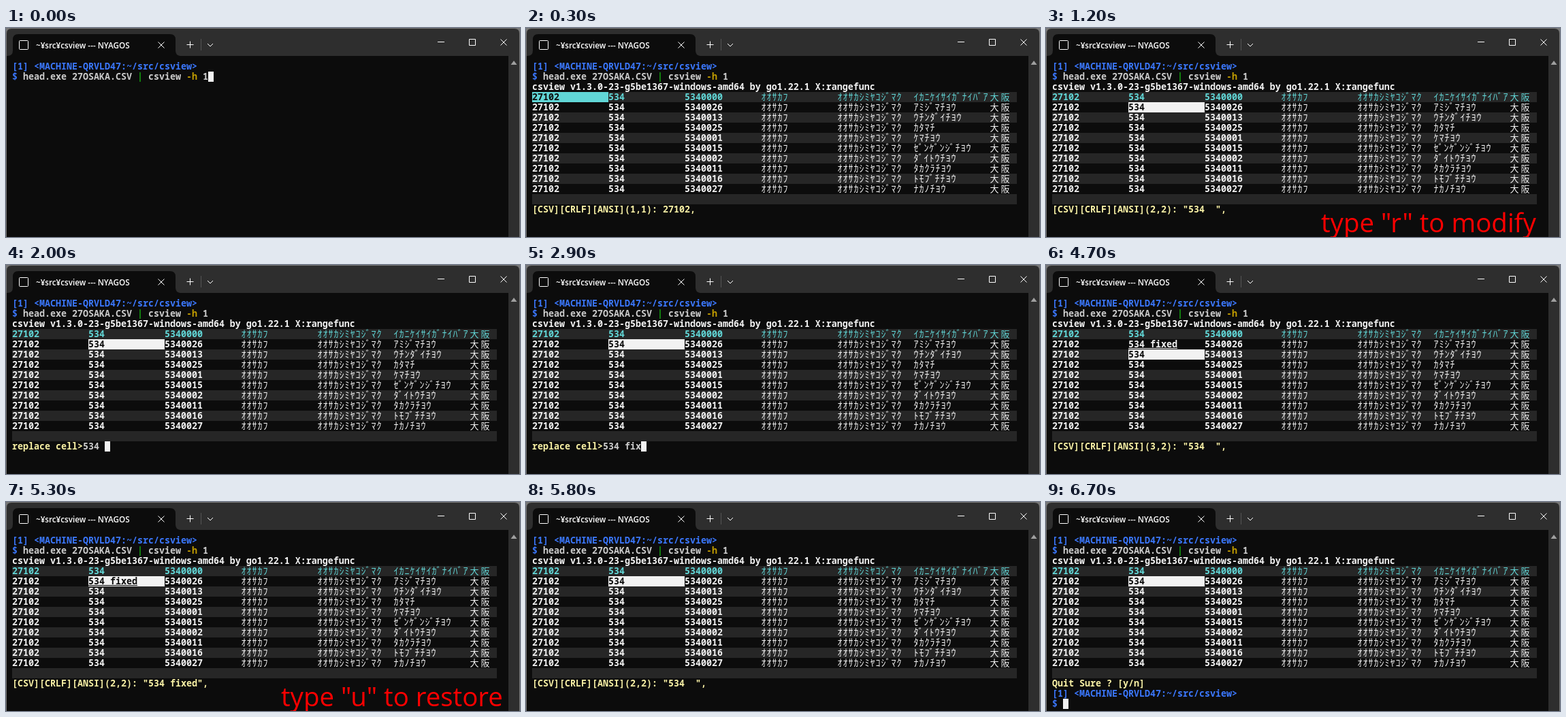
These frames come from a looping animation (755 px wide and 307 px high, 7000 ms). An HTML page:

```html
<!DOCTYPE html>
<html lang="en">
<head>
<meta charset="utf-8">
<title>csview in a terminal</title>
<style>
html, body { margin: 0; width: 100%; height: 100%; overflow: hidden; background: #0c0c0c; }
svg { display: block; }
text { white-space: pre; }
.mono { font: 600 13.333px "Noto Sans Mono", "DejaVu Sans Mono", monospace; }
.kana { font: 500 14px "Noto Sans CJK JP", "Noto Sans CJK", sans-serif; letter-spacing: 1px; }
.kanji { font: 500 13px "Noto Sans CJK JP", "Noto Sans CJK", sans-serif; letter-spacing: 3px; }
.title { font: 600 11.7px "Open Sans", "Noto Sans", sans-serif; fill: #fff; }
.note { font: 400 38.4px "Open Sans", "Noto Sans", sans-serif; fill: #f00; }
.line { fill: none; stroke: #fff; }
</style>
</head>
<body>
<svg width="755" height="307" viewBox="0 0 755 307">
  <rect width="755" height="307" fill="#777"/>
  <path d="M1 307V8Q1 1 8 1H747Q754 1 754 8V307Z" fill="#2e2e2e"/>
  <path d="M1 41H738V307H1Z" fill="#0c0c0c"/>
  <path d="M2 41Q10 41 10 33V17Q10 9 18 9H241Q249 9 249 17V33Q249 41 257 41Z" fill="#0c0c0c"/>
  <rect class="line" x="19.500" y="18.500" width="13" height="13" rx="1"/>
  <text class="title" x="44" y="29.500">~¥src¥csview --- NYAGOS</text>
  <path class="line" d="M223.500 20.500l9 9m0 -9l-9 9M265.500 24.500h10m-5 -5v10M296 23l4 4l4 -4"/>
  <path d="M286.500 16V33" stroke="#555"/>
  <path class="line" d="M634 20.500h10M680.500 16.500h9v9h-9zM726.500 16.500l9 9m0 -9l-9 9"/>
  <path d="M741.500 54L746 48L750.500 54Z" fill="#a0a0a0"/>
  <g id="screen"></g>
  <text id="note" class="note" x="404" y="300"></text>
</svg>
<script>
const LOOP = 7000, CW = 8, RH = 15, LEFT = 9, TOP = 49;
const BLACK = "#0c0c0c", WHITE = "#f2f2f2", GREY = "#cccccc", BLUE = "#3b78ff",
      CYAN = "#61d6d6", YELLOW = "#f9f1a5", GREEN = "#13a10e", GOLD = "#c19c00", BAND = "#262626";
const HEAD = 3, STATUS = 14, CELL = 14, WIDTH = 89;

const places = [
  "5340000 ｲｶﾆｹｲｻｲｶﾞﾅｲﾊﾞｱ", "5340026 ｱﾐｼﾞﾏﾁﾖｳ", "5340013 ｳﾁﾝﾀﾞｲﾁﾖｳ", "5340025 ｶﾀﾏﾁ",
  "5340001 ｹﾏﾁﾖｳ", "5340015 ｾﾞﾝｹﾞﾝｼﾞﾁﾖｳ", "5340002 ﾀﾞｲﾄｳﾁﾖｳ", "5340011 ﾀｶｸﾗﾁﾖｳ",
  "5340016 ﾄﾓﾌﾞﾁﾁﾖｳ", "5340027 ﾅｶﾉﾁﾖｳ"
].map(s => s.split(" "));

// time, row and column of the selected cell
const moves = [[300, 1, 1], [600, 1, 2], [900, 2, 2], [4100, 2, 3], [4400, 3, 3], [4700, 3, 2], [5000, 2, 2]];

const screen = document.getElementById("screen");
const note = document.getElementById("note");
const escape = s => s.replace(/&/g, "&amp;").replace(/</g, "&lt;").replace(/>/g, "&gt;");

const block = (col, row, cols, fill) =>
  `<rect x="${LEFT + col * CW}" y="${TOP + row * RH}" width="${cols * CW}" height="${RH}" fill="${fill}"/>`;

// wide scripts sit in the middle of their cells
const put = (col, row, s, fill, font = "mono") =>
  `<text class="${font}" x="${LEFT + col * CW + (font === "mono" ? 0 : 0.5)}" y="${TOP + row * RH + 12}" ` +
  `fill="${fill}">${escape(s)}</text>`;

const cursor = (col, row) => block(col, row, 1, WHITE);

const prompt = row =>
  put(0, row, "[1] <MACHINE-QRVLD47:~/src/csview>", BLUE) + put(0, row + 1, "$", BLUE);

const underline = (col, row, cols, fill) =>
  `<rect x="${LEFT + col * CW}" y="${TOP + row * RH + 13}" width="${cols * CW}" height="1" fill="${fill}"/>`;

function table(selRow, selCol, fixed) {
  let out = put(0, 2, "csview v1.3.0-23-g5be1367-windows-amd64 by go1.22.1 X:rangefunc", WHITE);
  for (let r = 0; r <= places.length; r += 2) out += block(0, HEAD + r, WIDTH, BAND);
  places.forEach(([zip, town], r) => {
    const y = HEAD + r, ink = r ? WHITE : CYAN, edited = fixed && r === 1;
    const cells = ["27102", edited ? "534 fixed" : "534", zip, "ｵｵｻｶﾌ", "ｵｵｻｶｼﾐﾔｺｼﾞﾏｸ", town, "大阪"];
    cells.forEach((s, c) => {
      const on = r + 1 === selRow && c + 1 === selCol, fill = on ? BLACK : ink;
      if (on) out += block(c * CELL, y, CELL, ink);
      out += put(c * CELL, y, s, fill, c < 3 ? "mono" : c < 6 ? "kana" : "kanji");
      if (edited && c === 1) out += underline(CELL, y, s.length, fill);
    });
  });
  return out;
}

function status(row, col, fixed) {
  const value = col === 1 ? "27102"
    : `"${col === 3 ? places[row - 1][0] : fixed && row === 2 ? "534 fixed" : "534  "}"`;
  return put(0, STATUS, `[CSV][CRLF][ANSI](${row},${col}): ${value},`, YELLOW);
}

function editor(t) {
  const n = Math.floor((t - 1700) / 300);
  const typed = n ? "534 fixed".slice(0, 3 + n) : "534  ";
  return put(0, STATUS, "replace cell>", YELLOW) + put(13, STATUS, typed, GREY) +
    cursor(13 + typed.length, STATUS);
}

function quit(t) {
  let out = put(0, STATUS, "Quit Sure ? [y/n]", YELLOW);
  if (t >= 6700) out += prompt(STATUS + 1) + cursor(2, STATUS + 2);
  else if (t >= 6400) out += cursor(0, STATUS + 1);
  return out;
}

function render(t) {
  let out = prompt(0) + put(2, 1, "head.exe 27OSAKA.CSV", GREY) + put(23, 1, "|", GREEN) +
    put(25, 1, "csview", GREY) + put(32, 1, "-h", GOLD) + put(35, 1, "1", GREY);
  if (t < 300) return out + cursor(36, 1);
  const [, row, col] = moves.filter(m => m[0] <= t).pop();
  const fixed = t >= 3800 && t < 5800;
  out += table(row, col, fixed);
  if (t >= 1700 && t < 3800) return out + editor(t);
  return out + (t >= 6100 ? quit(t) : status(row, col, fixed));
}

function caption(t) {
  if (t >= 1200 && t < 1700) return 'type "r" to modify';
  if (t >= 5300 && t < 5800) return 'type "u" to restore';
  return "";
}

let start, shown;
function frame(now) {
  start ??= now;
  const t = (now - start) % LOOP, tick = Math.floor(t / 100);
  if (tick !== shown) {
    shown = tick;
    screen.innerHTML = render(tick * 100);
    note.textContent = caption(tick * 100);
  }
  requestAnimationFrame(frame);
}
requestAnimationFrame(frame);
</script>
</body>
</html>
```
